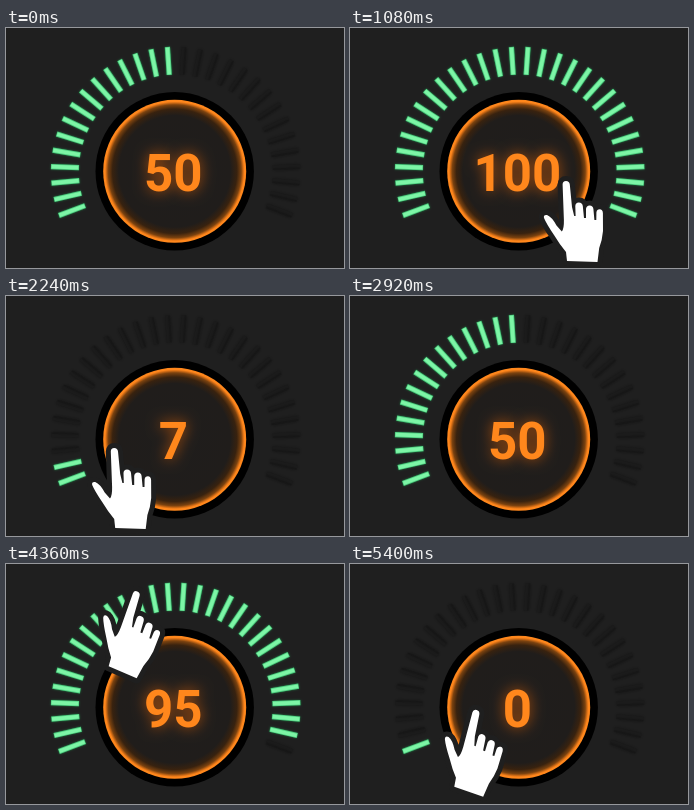
These frames come from a looping animation (338 px wide and 240 px high, 5.76 s). An HTML page with a canvas:

```html
<!DOCTYPE html>
<html lang="en">
<head>
<meta charset="utf-8">
<title>Knob control</title>
<style>
  html, body { margin: 0; width: 100%; height: 100%; overflow: hidden; background: #1f1f1f; }
  canvas { display: block; }
</style>
</head>
<body>
<canvas id="stage" width="338" height="240"></canvas>
<script>
const ctx = document.getElementById('stage').getContext('2d');
const LOOP = 5760, STEP = 40, HALF = 2920;
const BARS = 30, SPREAD = 7.63;
const BACK = '#1f1f1f', ORANGE = '#ff871c';
const knob = { x: 168.7, y: 143.3 };
const hand = new Path2D(
  'M-3.4 4.5 Q-3.4 1 0 1 Q3.4 1 3.8 4.5 L6 27 L8.2 36 L9.6 36 ' +
  'L9.3 26 Q9.5 22.5 12.8 22.5 Q16.3 22.5 16.8 26 L18 38 L20 38 ' +
  'L20 29 Q20.4 25.5 23.6 25.5 Q27 25.5 27.4 29 L28.4 40 L30.3 40 ' +
  'L30.4 32.5 Q30.8 29.3 33.7 29.3 Q36.6 29.3 36.9 33 L37 51 Q36.3 60 33.2 68 L31.5 82 L1 81 L0 72 ' +
  'Q-6 65 -12 55 Q-19.5 44 -22 38 Q-22.8 34.5 -19 35 Q-14 37 -9.5 45.5 L-4.2 51.5 Q-1.9 49 -2.1 40 Z');

const part = (t, a, b) => Math.min(1, Math.max(0, (t - a) / (b - a)));
const mix = (a, b, p) => a + (b - a) * p;

function pose(t) {
  if (t < HALF) {
    const v = t < 1400
      ? mix(50, 100, part(t, 440, 1000))
      : mix(100, 0, part(t, 1400, 2300));
    return {
      v, x: 100.5 + v * 1.155, y: 151 + v * 0.01, turn: 0,
      alpha: t < 160 ? 0 : part(t, 120, 320)
    };
  }
  const rising = t < 4320;
  const v = rising
    ? mix(50, 100, part(t, 3315, 3930))
    : mix(100, 0, part(t, 4320, 5120));
  const y = rising
    ? mix(138, 21, Math.pow(part(t, 3320, 3920), 0.85))
    : mix(21, 145, part(t, 4320, 5220));
  const drop = (y - 69) / 76;
  return {
    v, y, x: 130 - 3 * drop, turn: 20 - 3 * drop,
    alpha: t < 3040 ? 0 : part(t, 3000, 3200)
  };
}

function glow(color, blur) {
  ctx.shadowColor = color;
  ctx.shadowBlur = blur;
}

function disc(r, fill) {
  ctx.beginPath();
  ctx.arc(knob.x, knob.y, r, 0, Math.PI * 2);
  ctx.fillStyle = fill;
  ctx.fill();
}

function drawBar(i, lit) {
  ctx.save();
  ctx.translate(169.7, 143.5);
  ctx.rotate((i - (BARS - 1) / 2) * SPREAD * Math.PI / 180);
  if (lit) {
    glow('#1c8a48', 2);
    ctx.fillStyle = '#4fce80';
    ctx.fillRect(-2.6, -124.8, 5.2, 28);
    glow('transparent', 0);
    ctx.fillStyle = '#7df5a6';
    ctx.fillRect(-1.8, -124.2, 3.6, 26.8);
  } else {
    glow('#151515', 4);
    ctx.fillStyle = '#1b1b1b';
    ctx.fillRect(-2.4, -124.6, 4.8, 27.6);
    ctx.fillStyle = '#171717';
    ctx.fillRect(0.8, -124, 1.4, 26.5);
  }
  ctx.restore();
}

function drawKnob(v) {
  disc(79.2, '#000');
  const face = ctx.createRadialGradient(knob.x, knob.y, 0, knob.x, knob.y, 71.5);
  face.addColorStop(0, '#1f1d1c');
  face.addColorStop(0.78, '#201d1b');
  face.addColorStop(0.87, '#38220f');
  face.addColorStop(0.93, '#7b420f');
  face.addColorStop(0.96, '#d97016');
  face.addColorStop(0.975, ORANGE);
  face.addColorStop(1, ORANGE);
  disc(71.5, face);

  ctx.save();
  ctx.font = '700 51px Roboto, "Open Sans", sans-serif';
  ctx.textAlign = 'center';
  ctx.textBaseline = 'alphabetic';
  ctx.fillStyle = ORANGE;
  glow('#b4520a', 14);
  ctx.fillText(Math.round(v), 167.3, 163);
  ctx.restore();
}

function drawHand({ x, y, turn, alpha }) {
  if (!alpha) return;
  ctx.save();
  ctx.globalAlpha = alpha;
  ctx.translate(x, y);
  ctx.rotate(turn * Math.PI / 180);
  ctx.lineJoin = 'round';
  ctx.strokeStyle = BACK;
  ctx.lineWidth = 10;
  ctx.stroke(hand);
  ctx.fillStyle = '#fff';
  ctx.fill(hand);
  ctx.restore();
}

function draw(t) {
  const now = pose(t);
  const count = Math.max(1, Math.round(now.v * BARS / 100));
  ctx.fillStyle = BACK;
  ctx.fillRect(0, 0, 338, 240);
  for (let i = 0; i < BARS; i++) drawBar(i, i < count);
  drawKnob(now.v);
  drawHand(now);
}

const start = performance.now();
function tick() {
  const t = (performance.now() - start) % LOOP;
  draw(Math.floor(t / STEP) * STEP);
  requestAnimationFrame(tick);
}
tick();
</script>
</body>
</html>
```
